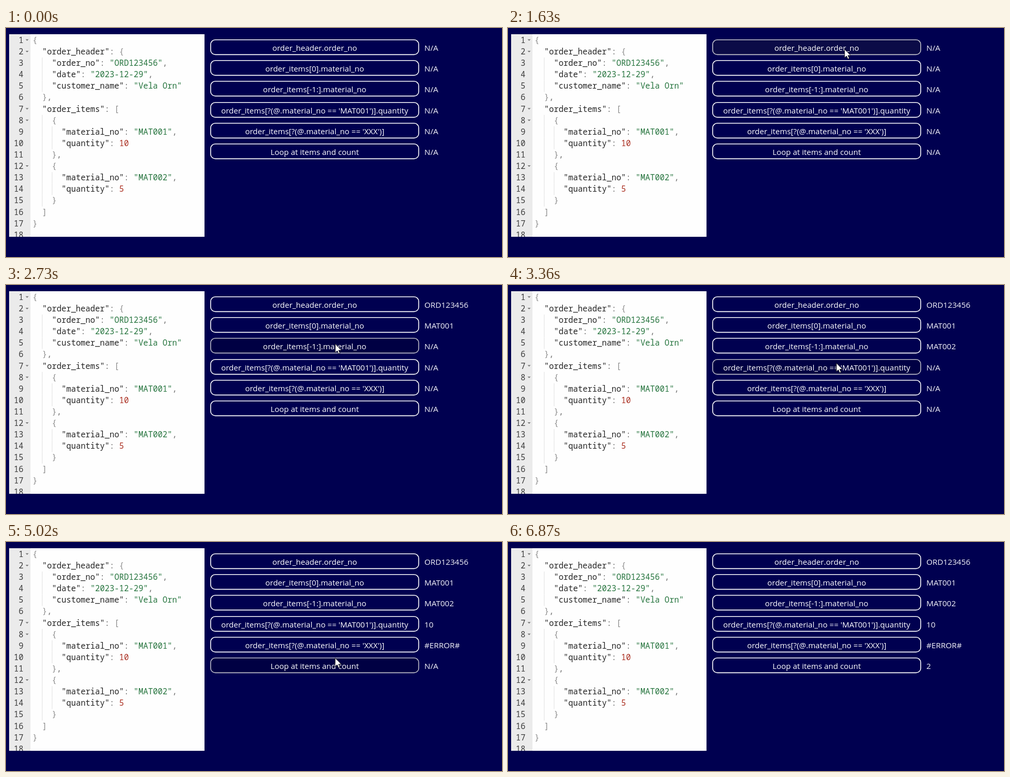
These frames come from a looping animation (952 by 442 pixels, 6.94 s). An HTML page with a canvas:

```html
<!DOCTYPE html>
<html lang="en">
<head>
<meta charset="utf-8">
<style>
  html, body { margin: 0; width: 100%; height: 100%; overflow: hidden; background: #000050; }
  canvas { display: block; }
</style>
</head>
<body>
<canvas id="stage" width="952" height="442"></canvas>
<script>
const ctx = document.getElementById('stage').getContext('2d');
const LOOP = 6940;
const MONO = '15.4px "Noto Sans Mono", monospace';
const LABEL = '500 15px "Open Sans", sans-serif';
const VALUE = '15.2px "Open Sans", sans-serif';
const CHAR = 9.24, LINE = 22.12, CODE_X = 51;

const code = `{
  "order_header": {
    "order_no": "ORD123456",
    "date": "2023-12-29",
    "customer_name": "Vela Orn"
  },
  "order_items": [
    {
      "material_no": "MAT001",
      "quantity": 10
    },
    {
      "material_no": "MAT002",
      "quantity": 5
    }
  ]
}
`.split('\n');

// label, value, press time, time the value arrives
const rows = [
  ['order_header.order_no', 'ORD123456', 1560, 1770],
  ['order_items[0].material_no', 'MAT001', 2180, 2390],
  ['order_items[-1:].material_no', 'MAT002', 2870, 3080],
  ["order_items[?(@.material_no == 'MAT001')].quantity", '10', 3640, 3850],
  ["order_items[?(@.material_no == 'XXX')]", '#ERROR#', 4470, 4680],
  ['Loop at items and count', '2', 5300, 5510],
];
const PRESS_TIME = 70;
const rowY = i => Math.round(22 + 40.2 * i);

// cursor moves: start, end, x, y at the end
const START = [903, 396];
const moves = [
  [530, 1160, 645, 48], [1160, 1300, 646, 41], [1800, 1980, 638, 74],
  [2480, 2730, 632, 114], [3200, 3450, 630, 156], [3990, 4200, 631, 196],
  [4900, 5120, 632, 231], [5650, 6340, 900, 436],
];

function cursorAt(t) {
  if (t < 530 || t >= 6340) return null;
  let [x, y] = START;
  for (const [from, to, endX, endY] of moves) {
    if (t < from) break;
    const u = Math.min(1, (t - from) / (to - from));
    const k = 1 - (1 - u) ** 2;
    x += (endX - x) * k;
    y += (endY - y) * k;
  }
  return { x, y };
}

function text(str, x, y, color, align = 'left') {
  ctx.fillStyle = color;
  ctx.textAlign = align;
  ctx.fillText(str, x, y);
}

function tokenColor(token, isKey) {
  if (token[0] === '"') return isKey ? '#262626' : '#27753f';
  if (/\d/.test(token)) return '#ab3022';
  return /[:,]/.test(token) ? '#707070' : '#8c8c8c';
}

function drawEditor() {
  ctx.save();
  ctx.beginPath();
  ctx.rect(6, 12, 375, 391);
  ctx.clip();
  ctx.fillStyle = '#fefefe';
  ctx.fillRect(6, 12, 375, 391);
  ctx.fillStyle = '#ebebeb';
  ctx.fillRect(6, 12, 41, 391);
  ctx.font = MONO;
  code.forEach((line, i) => {
    const y = 28.8 + LINE * i;
    text(i + 1, 33.5, y, '#3c3c3c', 'right');
    if (/[{[]$/.test(line)) {
      ctx.fillStyle = '#777';
      ctx.beginPath();
      ctx.moveTo(37.5, y - 7);
      ctx.lineTo(43.5, y - 7);
      ctx.lineTo(40.5, y - 4);
      ctx.fill();
    }
    const indent = line.search(/\S/);
    ctx.fillStyle = '#e2e2e2';
    for (let col = 2; col < indent; col += 2) {
      ctx.fillRect(Math.round(CODE_X + col * CHAR), y - 16, 1, LINE);
    }
    for (const m of line.matchAll(/"[^"]*"|\d+|\S/g)) {
      const isKey = line[m.index + m[0].length] === ':';
      text(m[0], CODE_X + m.index * CHAR, y, tokenColor(m[0], isKey));
    }
  });
  ctx.restore();
}

function drawRow([label, value, press, done], i, t, cursor) {
  const y = rowY(i);
  const hover = cursor && cursor.x > 392 && cursor.x < 793 && cursor.y > y && cursor.y < y + 30;
  const since = t - press;
  let fill = '#000050', border = '#fff';
  if (since >= 0 && since < PRESS_TIME) [fill, border] = ['#000038', '#8c8c84'];
  else if (since >= PRESS_TIME && since < 2 * PRESS_TIME) [fill, border] = ['#0b0b47', '#c4c4cc'];
  else if (hover) [fill, border] = ['#000043', '#bcbcc6'];

  ctx.fillStyle = fill;
  ctx.strokeStyle = border;
  ctx.lineWidth = 1.6;
  ctx.beginPath();
  ctx.roundRect(392.8, y + 0.8, 399.4, 28.6, 9);
  ctx.fill();
  ctx.stroke();
  ctx.font = LABEL;
  text(label, 592.5, y + 21.5, '#fff', 'center');
  ctx.font = VALUE;
  text(t < done ? 'N/A' : value, 803, y + 21.5, '#f4f4fa');
}

const arrow = new Path2D('M0 0V16.5L3.8 13L6.4 18.8L9 17.7L6.5 12H11.8Z');

function drawCursor({ x, y }, pressed) {
  if (pressed) {
    ctx.fillStyle = 'rgba(190, 172, 15, .68)';
    ctx.beginPath();
    ctx.arc(x, y, 12, 0, Math.PI * 2);
    ctx.fill();
  }
  ctx.save();
  ctx.translate(x, y);
  ctx.fillStyle = '#fff';
  ctx.strokeStyle = '#101018';
  ctx.lineWidth = 1;
  ctx.fill(arrow);
  ctx.stroke(arrow);
  ctx.restore();
}

function draw(now) {
  const t = now % LOOP;
  const cursor = cursorAt(t);
  ctx.fillStyle = '#000050';
  ctx.fillRect(0, 0, 952, 442);
  drawEditor();
  rows.forEach((row, i) => drawRow(row, i, t, cursor));
  if (cursor) drawCursor(cursor, rows.some(([, , press]) => t >= press && t < press + PRESS_TIME));
  requestAnimationFrame(draw);
}
draw(0);
</script>
</body>
</html>
```
